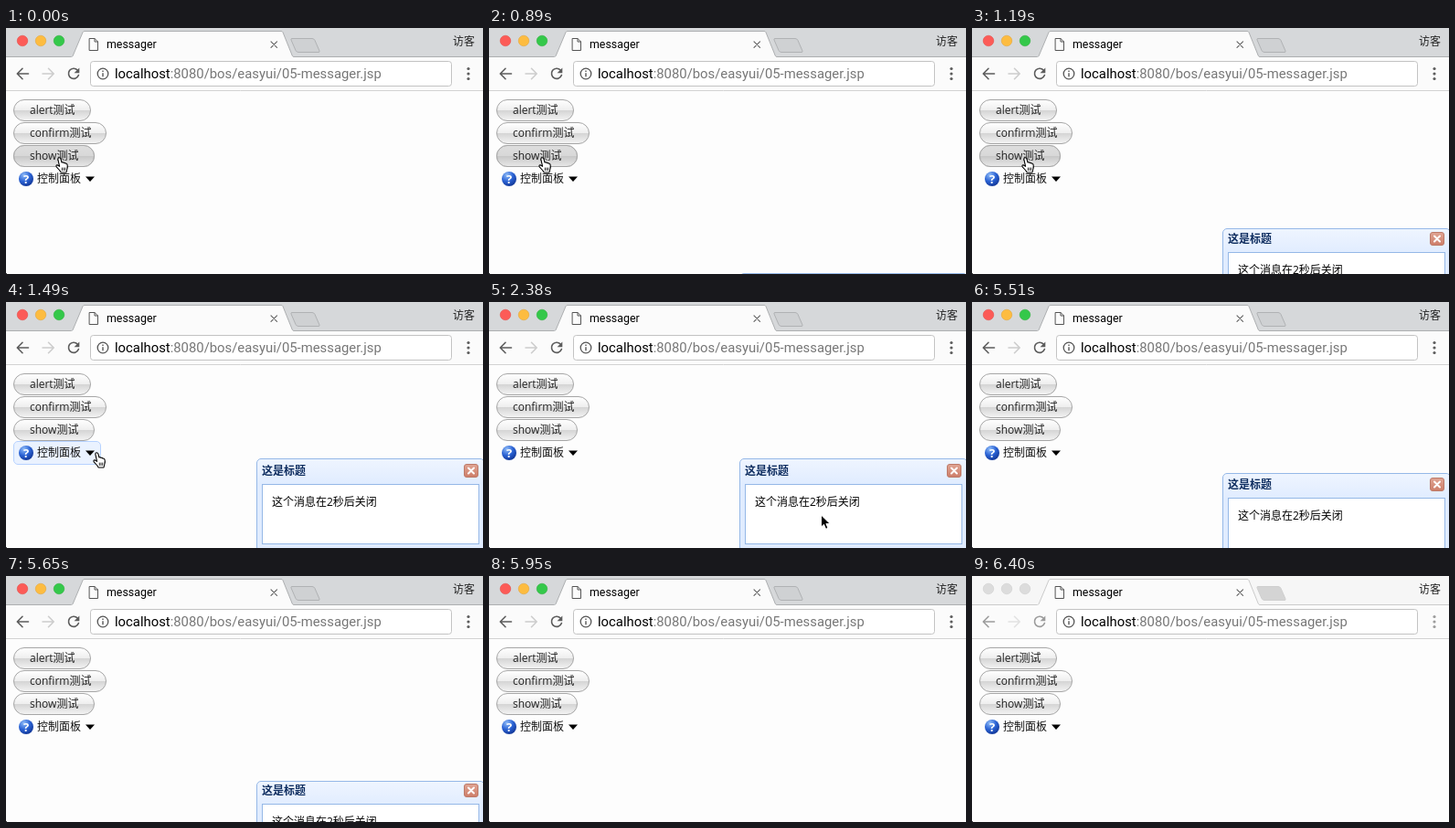
Recreate the animation shown at these times as an HTML page. Size 522 px wide and 269 px high, loop 6.45 s.

```html
<!DOCTYPE html>
<html lang="zh-CN">
<head>
<meta charset="utf-8">
<title>messager</title>
<style>
  html, body { margin: 0; width: 100%; height: 100%; overflow: hidden; background: #fdfdfd; }
  svg { display: block; width: 522px; height: 269px; }
  text { font: 12px "Open Sans", "Noto Sans CJK SC", "Noto Sans CJK", sans-serif; white-space: pre; }
  .ui { font-family: Roboto, "Noto Sans CJK SC", "Noto Sans CJK", sans-serif; }
  .line { fill: none; stroke-linecap: round; stroke-linejoin: round; }
</style>
</head>
<body>
<svg id="stage" viewBox="0 0 522 269" xmlns="http://www.w3.org/2000/svg"></svg>
<script>
const LOOP = 6450;
const stage = document.getElementById('stage');
const $ = id => document.getElementById(id);

const defs = `<defs>
  <linearGradient id="pill" x2="0" y2="1">
    <stop offset="0" stop-color="#fff"/><stop offset=".5" stop-color="#eee"/>
    <stop offset=".52" stop-color="#d5d5d5"/><stop offset="1" stop-color="#f4f4f4"/>
  </linearGradient>
  <linearGradient id="pillHot" x2="0" y2="1">
    <stop offset="0" stop-color="#dedede"/><stop offset=".5" stop-color="#d8d8d8"/>
    <stop offset=".52" stop-color="#c8c8c8"/><stop offset="1" stop-color="#e8e8e8"/>
  </linearGradient>
  <linearGradient id="head" gradientUnits="userSpaceOnUse" x1="0" y1="0" x2="0" y2="28">
    <stop offset="0" stop-color="#eff5ff"/><stop offset="1" stop-color="#e0ecff"/>
  </linearGradient>
  <linearGradient id="shut" x2="0" y2="1">
    <stop offset="0" stop-color="#e0a594"/><stop offset="1" stop-color="#cd7d68"/>
  </linearGradient>
  <radialGradient id="ball" cx=".35" cy=".25" r=".85">
    <stop offset="0" stop-color="#8fbcf8"/><stop offset=".5" stop-color="#2a62d4"/>
    <stop offset="1" stop-color="#0d2f8c"/>
  </radialGradient>
</defs>`;

// Browser frame; the look depends on whether the window has focus.
const light = (fill, rim, i) =>
  `<circle cx="${18 + i * 20}" cy="14" r="5.8" fill="${fill}" stroke="${rim}" stroke-width=".5"/>`;

const frame = (id, c) => `<g id="${id}">
  <rect width="522" height="32" fill="${c.strip}"/>
  <rect y="31" width="522" height="37" fill="#fbfbfb"/>
  <path d="M0 31.5H71.5Q72.7 31.5 73.2 30.3L84 4.7Q84.5 3.5 86 3.5H301Q302.5 3.5 303 4.7L313.3 30.3Q313.8 31.5 315 31.5H522"
    fill="#fbfbfb" stroke="${c.edge}"/>
  ${c.lights.map((fill, i) => light(fill, c.rims[i], i)).join('')}
  <path d="M313 11.5H335Q337 11.5 338 13.5L343 25Q343.5 26.5 342 26.5H320Q318 26.5 317 24.5L312 13Q311.5 11.5 313 11.5Z"
    fill="${c.plus}" stroke="${c.plusEdge}"/>
  <path class="line" d="M91.5 11.5H97L100.5 15V24.5H91.5ZM97 11.5V15H100.5" stroke="#555"/>
  <path class="line" d="M290 14.8L296.5 21.3M296.5 14.8L290 21.3" stroke="#666" stroke-width="1.2"/>
  <text class="ui" x="110" y="22" style="font-size:12.4px" fill="#000">messager</text>
  <text class="ui" x="489" y="19" fill="#222">访客</text>
  <path class="line" d="M24.5 50H12.5M18 44.3L12.3 50L18 55.7" stroke="${c.icon}" stroke-width="1.6"/>
  <path class="line" d="M40 50H52M46.5 44.3L52.2 50L46.5 55.7" stroke="${c.faint}" stroke-width="1.6"/>
  <path class="line" d="M78.2 46A5.6 5.6 0 1 0 79.4 51.5" stroke="${c.icon}" stroke-width="1.6"/>
  <path d="M80.3 43.5V49.2H74.6Z" fill="${c.icon}"/>
  <rect x="92.5" y="36.5" width="395" height="27" rx="3" fill="#fff" stroke="#c3c3c3"/>
  ${[44.5, 50, 55.5].map(y => `<circle cx="506" cy="${y}" r="1.6" fill="${c.icon}"/>`).join('')}
  <circle cx="106" cy="50" r="5.8" fill="none" stroke="#555" stroke-width="1.3"/>
  <path d="M106 49.3V53.2M106 46.5V47.9" stroke="#555" stroke-width="1.4"/>
  <text class="ui" x="119" y="55.4" style="font-size:14.85px" fill="#000">localhost<tspan fill="#777">:8080/bos/easyui/05-messager.jsp</tspan></text>
  <path d="M0 68.5H522" stroke="#d2d2d2"/>
</g>`;

const capsule = (y, w, paint, id = '') =>
  `<rect ${id && `id="${id}"`} x="8.5" y="${y + .5}" width="${w - 1}" height="23" rx="11.5" fill="url(#${paint})" stroke="#a6a6a6"/>`;

const button = (y, w, label, hotId) => `
  ${capsule(y, w, 'pill')}
  ${hotId ? capsule(y, w, 'pillHot', hotId) : ''}
  <text x="26" y="${y + 16}" fill="#222">${label}</text>`;

const page = `
  ${button(78, 85, 'alert测试')}
  ${button(103, 102, 'confirm测试')}
  ${button(128, 89, 'show测试', 'showHot')}
  <rect id="menuHot" x="8.5" y="152.5" width="95" height="25" rx="4.5" fill="#eaf2ff" stroke="#b7d2ff"/>
  <circle cx="22" cy="165" r="8" fill="url(#ball)"/>
  <text x="22" y="170" text-anchor="middle" style="font-size:13px;font-weight:700" fill="#fff">?</text>
  <text x="34" y="169" fill="#111">控制面板</text>
  <path d="M87 162.5H97L92 168Z" fill="#000"/>
  <path d="M0 268H1V269H0Z" fill="#444"/>`;

const popup = `<g id="popup">
  <rect x="274.5" y=".5" width="249" height="101" rx="4.5" fill="url(#head)" stroke="#95b8e7"/>
  <g id="content">
    <text x="280" y="18" style="font-weight:700" fill="#0e2d5f">这是标题</text>
    <rect x="501.5" y="6.5" width="15" height="14" rx="2.5" fill="url(#shut)" stroke="#bd7a68"/>
    <path class="line" d="M506 10.5L512 16.5M512 10.5L506 16.5" stroke="#fff" stroke-width="2"/>
    <rect x="280.5" y="28.5" width="237" height="65" fill="#fff" stroke="#95b8e7"/>
    <text x="291" y="52" fill="#000">这个消息在2秒后关闭</text>
  </g>
</g>`;

const cursors = `
  <g id="hand" stroke="#000" stroke-width="1.1" stroke-linejoin="round">
    <path fill="#fff" d="M2.8 2.4Q2.8 .9 4.1 .8T5.9 2.2L7 6Q8.2 5.3 9 6.4Q10.2 5.8 11 7.1Q12.4 6.7 13 8.2Q13.7 10.5 12.9 13L12 17H6.2L4.6 14.5L1.2 10.8Q.4 9 2 8.8L4.6 10.3Z"/>
    <path class="line" d="M7.3 12V14.5M9 12V14.5M10.7 12V14.5" stroke-width=".8"/>
  </g>
  <path id="arrow" d="M1.5 1V14L4.5 11.3L6.6 16.3L9 15.3L6.9 10.5H11.2Z" fill="#000" stroke="#fff"/>
  <path id="beam" class="line" d="M1.5 1Q4 1 4 3Q4 1 6.5 1M4 2.5V14.5M1.5 16Q4 16 4 14Q4 16 6.5 16M3 9.5H5" stroke="#222"/>`;

stage.innerHTML = defs + '<rect width="522" height="269" fill="#fdfdfd"/>' + page + popup +
  frame('focused', {
    strip: '#d6d8da', edge: '#adafb1', plus: '#cfd1d3', plusEdge: '#b0b2b4', icon: '#5c5c5c', faint: '#cdcdcd',
    lights: ['#fc5b57', '#fdbc40', '#34c84a'], rims: ['#e2453f', '#e0a033', '#27aa35']
  }) +
  frame('blurred', {
    strip: '#f6f6f6', edge: '#cbcbcb', plus: '#d4d4d4', plusEdge: '#cfcfcf', icon: '#9c9c9c', faint: '#e2e2e2',
    lights: Array(3).fill('#dcdcdc'), rims: Array(3).fill('#cacaca')
  }) + cursors;

// Steps are [time, value]; each value holds until the next time.
function play(id, prop, steps, format = v => v) {
  const keys = steps.map(([t, v]) => ({ offset: t / LOOP, [prop]: format(v), easing: 'step-end' }));
  keys.push({ ...keys[keys.length - 1], offset: 1 });
  $(id).animate(keys, { duration: LOOP, iterations: Infinity });
}
const at = ([x, y]) => `translate(${x}px, ${y}px)`;
const move = (id, steps) => play(id, 'transform', steps, at);
const show = (id, steps) => play(id, 'opacity', steps);
const away = [-100, -100];

// The popup's 5px top padding grows along with its height.
const slide = [
  [0, 275], [890, 268], [1040, 255], [1190, 219], [1340, 186], [1490, 171],
  [5510, 187], [5650, 224], [5800, 256], [5950, 275]
];
move('popup', slide.map(([t, top]) => [t, [0, top]]));
move('content', slide.map(([t, top]) => [t, [0, -Math.round(5 * (top - 171) / 98)]]));

show('showHot', [[0, 1], [1490, 0]]);
show('menuHot', [[0, 0], [1490, 1], [1640, 0]]);
show('focused', [[0, 1], [6400, 0]]);
show('blurred', [[0, 0], [6400, 1]]);

move('hand', [[0, [54, 141]], [1490, [95, 164]], [1640, away]]);
move('beam', [
  [0, away], [1790, [328, 206]], [1940, [338, 208]], [2090, [343, 211]], [2230, [351, 217]], [2380, away]
]);
move('arrow', [
  [0, away], [1640, [196, 187]], [1790, away], [2380, [362, 232]], [2530, [364, 238]],
  [2670, [365, 240]], [2820, [365, 243]], [3110, [367, 245]], [3260, [414, 264]], [3410, away]
]);
</script>
</body>
</html>
```
